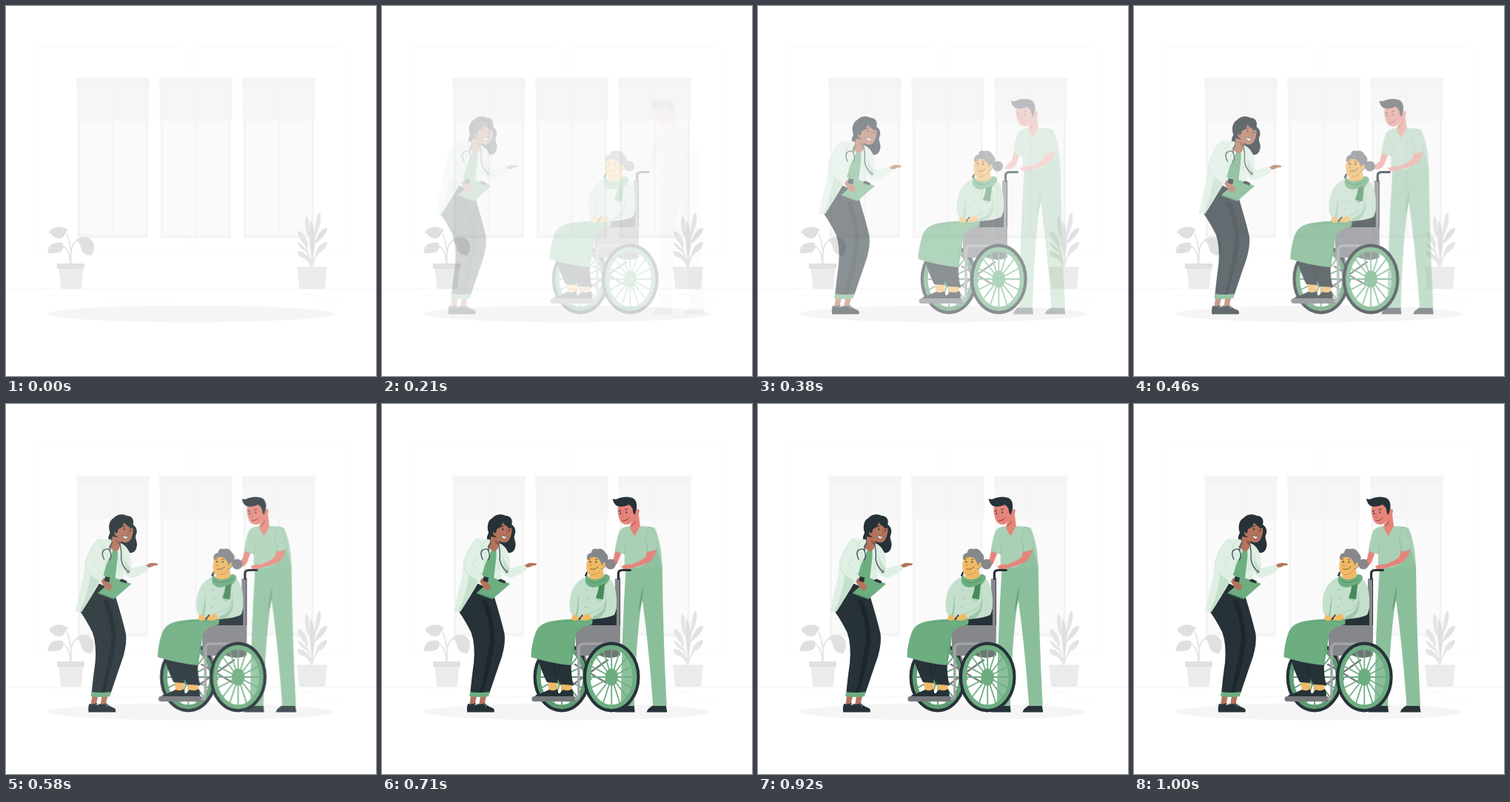
Recreate the animation shown at these times as an HTML page. Size 500x500 px, loop 1040 ms.

```html
<!DOCTYPE html>
<html lang="en">
<head>
<meta charset="utf-8">
<title>Clinic visit</title>
<style>
html, body { margin: 0; width: 100%; height: 100%; overflow: hidden; background: #fff; }
svg { display: block; width: 100vw; height: 100vh; }
.line { fill: none; stroke-linecap: round; stroke-linejoin: round; }
.navy { fill: #263238; }
.green { fill: #6dae81; }
.coat { fill: #dfefe4; }
.fold { fill: #c5dfcd; }
.brown { fill: #b4735b; }
.pink { fill: #e5857a; }
.tan { fill: #efb967; }
.grey { fill: #85878b; }
</style>
</head>
<body>
<svg viewBox="0 0 500 500">
  <defs>
    <g id="window">
      <path fill="#f4f4f4" d="M97 106H192V313.500H97Z"/>
      <path fill="#fafafa" d="M100 108H143V309.500H100ZM145.500 108H188.500V309.500H145.500Z"/>
      <path fill="#f7f7f7" fill-opacity=".7" d="M95.500 107H193.500V155.500H95.500Z"/>
      <path stroke="#f4f4f4" stroke-width="98" stroke-dasharray="1 2" d="M144.500 109V156"/>
      <path fill="#f4f4f4" d="M95 97H194V107.500H95Z"/>
    </g>
  </defs>

  <g id="room">
    <g fill="none" stroke="#fafafa">
      <rect x="39" y="55.500" width="203.500" height="282" rx="5"/>
      <rect x="255" y="55.500" width="203.500" height="282" rx="5"/>
      <path stroke="#f5f5f5" d="M0 382.500H500"/>
      <path stroke="#f8f8f8" d="M56 391H96M135 395.500H224M400 389.500H416M417 398.500H449"/>
    </g>
    <use href="#window"/><use href="#window" x="112"/><use href="#window" x="224"/>
    <ellipse cx="250" cy="416" rx="194" ry="11.300" fill="#f5f5f5"/>
    <g fill="#e0e0e0">
      <path class="line" stroke="#e5e5e5" stroke-width="1.800" d="M87 348C89 330 86 312 79 304M87 348Q86 328 76 324M88 348Q86 318 98 317"/>
      <path d="M58 305C64 297 76 296 84 303C78 307 80 313 73 314C65 314 61 309 58 305Z"/>
      <path d="M57 334C56 323 64 318 76 320C79 325 77 332 71 333Q64 335 57 334Z"/>
      <path d="M95 316C106 307 119 315 119 325Q119 332 115 337C107 337 102 333 101 326Q99 318 95 316Z"/>
      <path fill="#ebebeb" d="M71 354H104.500L101.500 382H74.500Z"/>
      <rect x="69" y="348" width="37" height="7" rx="1"/>
    </g>
    <g fill="#e5e5e5">
      <path class="line" stroke="#e5e5e5" stroke-width="2" d="M413 353Q410 342 400 338M413 353Q416 340 428 324M413 353Q408 330 400 310M413 353L414 320M414 345Q416 312 422 285M414 345L408 290"/>
      <path d="M408 312C403 301 403 288 406 283C411 289 410 302 410 312ZM418 310C417 294 420 281 424 279C427 284 425 297 419 310Z"/>
      <path fill="#e0e0e0" d="M414 334C409 317 410 300 412 290C418 299 419 320 415 334ZM417 322C420 308 428 299 434 300C435 306 425 316 417 322Z"/>
      <path d="M408 326C399 320 393 309 394 304C402 304 407 315 409 326ZM418 336C420 325 428 318 434 319C435 327 426 333 418 336ZM408 342C398 341 393 336 394 331C402 331 407 336 409 342ZM405 332Q395 327 394 319Q403 323 408 334ZM412 352C409 344 407 338 401 337Q411 336 415 350Z"/>
      <path fill="#ebebeb" d="M393 352.500H434L431 382H396.500Z"/>
    </g>
  </g>

  <g id="doctor">
    <!-- hair behind the head -->
    <path class="navy" d="M143 187C139 183 141 178 143 174C140 166 142 157 148 154C152 149 160 148 166 151C173 151 176 157 174 163C180 167 180 173 178 177C176 182 181 187 179 193C178 200 172 203 167 200C161 199 162 193 159 189L153 187C150 185 147 188 143 187Z"/>
    <!-- pointing hand -->
    <path class="brown" d="M191 218L197 215Q202 214 208 216L207 218L202 218.500Q199 221 193 221Z"/>
    <!-- shoes, ankles, trousers -->
    <path class="brown" d="M119 394H127L124 407H117ZM132 394H140L137 407H130Z"/>
    <path class="navy" d="M115 405Q120 407 125 404L130 412V416.500H114Q113 410 115 405ZM128 405Q133 407 138 404Q142 409 149 411Q152 414 150 416.500H127Q126 410 128 405Z"/>
    <path class="line" stroke="#dfefe4" d="M124 407L127 404M137 406L141 403M139 408L143 405"/>
    <path class="navy" d="M123 240L148 252Q160 291 164.500 311Q166 323 161 341Q152 367 144 391H118Q120 370 123 349Q125 325 119.500 309Q111 292 103 281Z"/>
    <path fill="#1c262b" d="M133 264L141 266Q151 297 151 320Q147 354 135 391H131Q141 347 145 319Q146 297 133 264Z"/>
    <path class="green" d="M118 389Q131 391 144 389L143 395Q130 397 117 395Z"/>
    <!-- shirt and coat -->
    <path class="green" d="M138 194L157 192L158 210L151 244L131 238Z"/>
    <path class="coat" d="M155 187Q167 191 171 205L172 222L191 217Q194 219 195 223Q184 232 173 235Q166 235 162 227L152 262L146 258L150 235Q153 213 155 187Z"/>
    <path class="fold" d="M162 205Q165 216 170 221L172 222Q168 225 163 226Z"/>
    <path class="coat" d="M144 183L127 182Q120 187 115 202Q108 216 107 233Q101 256 96 281H104.500Q117 262 131 238Q141 215 141 194Z"/>
    <path class="fold" d="M117 226L128 240Q117 262 104.500 281H102Q114 256 117 226Z"/>
    <path class="coat" stroke="#c5dfcd" stroke-width=".7" d="M128 183Q136 188 132 202L121 217L136 233L132 241Q120 236 111 224Q107 217 112 207Q119 187 128 183Z"/>
    <path class="coat" stroke="#c5dfcd" stroke-width=".7" d="M144 183L136 187L133 201L140 202L136 220Q144 206 148 194ZM156 187L162 195L158 201L161 205L156 225Q154 205 153 196Z"/>
    <!-- neck and head -->
    <path class="brown" d="M146 179L158 181L156 194Q153 200 149 199L141 193Q146 188 146 179Z"/>
    <path fill="#97594a" d="M151 183L158 187L157 191Q152 189 151 183Z"/>
    <path class="brown" d="M153 169Q155 159 163 159Q171 159 174 166Q175 176 171 183Q168 188 162 187Q156 186 153 179Q149 178 149 174Q150 170 153 173Z"/>
    <path class="navy" d="M151 175Q145 164 154 157Q165 150 174 162L174 168Q166 166 162 160Q161 167 154 169Q154 174 151 175Z"/>
    <path class="line" stroke="#263238" d="M160 166L163 165M169 167L172 168"/>
    <path class="line" stroke="#97594a" stroke-width=".8" d="M167 170L169 175L166 176"/>
    <ellipse class="navy" cx="162.200" cy="169.300" rx=".9" ry="1.300"/>
    <ellipse class="navy" cx="170.500" cy="171" rx=".8" ry="1.200"/>
    <path fill="#fff" stroke="#263238" stroke-width=".5" d="M160 177Q164 180 168 179Q166 183 163 182Q161 181 160 177Z"/>
    <!-- stethoscope -->
    <path class="line" stroke="#4b565b" stroke-width="1.400" d="M146 187Q142 193 143 199Q146 207 142 211M135 210Q130 199 136 197Q141 194 143 199M156 188Q159 198 158 210Q160 220 166 225"/>
    <circle cx="167.500" cy="226.500" r="2.300" fill="#85878b"/>
    <!-- clipboard -->
    <path class="green" d="M150 235L172 243L149 263L127 255Z"/>
    <path fill="#579a6d" d="M127 255L149 263L148 264L126.500 256Z"/>
    <path class="navy" d="M157 237L160 236.500L166 239.500L165 242.500L156 239.500Z"/>
    <path class="brown" d="M134 235Q141 239 144 244L147 247L144 248.500L145 251Q139 253 136 248L131 240Z"/>
    <path class="navy" d="M137 233L143 234.500L142 241L135 239Z"/>
  </g>

  <g id="patient">
    <g id="nurse">
      <path class="navy" d="M324 407H343L344 416.500H317Q318 411 324 407ZM369 407H386L387.500 416.500H360Q360 412 369 407Z"/>
      <path fill="#8bbf9b" d="M332 219H381Q382 315 387 408H368.500Q363 330 354 264Q346 307 343 408H325Q326 315 332 219Z"/>
      <path fill="#6da57f" d="M355 247Q356 265 349 281Q350 262 355 247Z"/>
      <path class="pink" d="M318 196L326 200L322 211Q320 219 311 221L304 219L315 209Z"/>
      <path fill="#a9d0b5" d="M338 165Q326 166 323 172Q319 183 317 198Q323 202 330 203V221H381Q380 187 371 168Q369 165 350 165Z"/>
      <path fill="#8fc19f" d="M374 194L381 221H350Q367 213 368 201Z"/>
      <path class="line" stroke="#8fc19f" stroke-width=".8" d="M330 203L332 187M361 199Q362 190 358 182"/>
      <path class="pink" d="M361 196L373 197Q371 207 364 213Q355 218 341 221Q336 224 328 223L326 219Q332 216 339 217Q353 212 359 206Z"/>
      <path fill="#a9d0b5" stroke="#8fc19f" stroke-width=".6" d="M363 166Q370 168 375 194Q369 200 361 199Q362 188 358 181Z"/>
      <path class="pink" d="M339 152L349 148L351 165L344 178Q339 173 337 165L341 162Z"/>
      <path fill="#cc6a62" d="M338 162Q344 160 346 155Q345 163 340 166Z"/>
      <path class="pink" d="M321 139Q329 134 343 137L345 143Q349 140 350 144Q350 150 345 150Q343 159 337 162Q329 165 324 158Q320 149 321 139Z"/>
      <path class="navy" d="M314 128Q319 130 323 127Q333 124 341 127Q347 130 346.500 140L344 150Q341 147 341 142Q339 138 336 136Q328 140 320 138Q315 135 314 128Z"/>
      <path class="line" stroke="#263238" d="M322 145L325 144M331 143L334 142"/>
      <path class="line" stroke="#cc6a62" stroke-width=".9" d="M328 148.500L326 153L329 154"/>
      <ellipse class="navy" cx="324.500" cy="148" rx=".8" ry="1.300"/>
      <ellipse class="navy" cx="332.500" cy="146.500" rx=".8" ry="1.300"/>
      <path class="line" stroke="#7d2d2d" stroke-width=".9" d="M328 157.500Q333 158 336 154"/>
    </g>

    <!-- far wheel, chair frame -->
    <g class="wheel" data-x="244" data-tint="#5d9d71"></g>
    <path class="line" stroke="#75787c" stroke-width="2.500" d="M262 352L303 376M258 380L306 346M275 340L283 372"/>
    <path class="grey" d="M316 236H322V304H316Z"/>
    <path class="line" stroke="#263238" stroke-width="3.200" d="M320.500 236V230Q320 224.500 326 224.500H336.500"/>
    <path class="line" stroke="#263238" d="M322.500 236V300"/>
    <path class="navy" d="M280 291L318 277V301H280Z"/>
    <path class="grey" d="M271 299H323V340H263V306Q264 300 271 299Z"/>
    <ellipse cx="309" cy="338" rx="14" ry="5" fill="#707377"/>
    <!-- legs and feet -->
    <path class="tan" d="M225 374L238 376L239 389H227ZM243 376L257 378L258 389H244Z"/>
    <path class="navy" d="M211 342L242 346L238 377L224 376Q216 360 211 342ZM232 345L257 350Q256 365 260 380L243 379Q234 361 232 345Z"/>
    <path class="line" stroke="#1c262b" d="M232 346Q234 361 242 378"/>
    <path class="navy" d="M227 386Q233 389 238 385L241 396H207Q209 392 216 391ZM246 386Q252 389 258 385Q260 388 260 397H233Q234 392 241 391Z"/>
    <rect x="203.500" y="395" width="60" height="7" rx="3.500" fill="#75787c"/>
    <!-- blanket -->
    <path class="green" d="M286 290Q248 290 230 293.500Q212 297 208 311Q203 325 202.500 342Q231 351 257 353Q261 333 263 315Q264 302 285 298Z"/>
    <path class="line" stroke="#579a6d" stroke-width=".7" d="M230 297Q258 290 280 295M257 352Q256 338 261 322"/>
    <!-- blouse and hands -->
    <path class="fold" d="M279 233Q267 236 260 248Q253 262 255 279L259 288L266 290H285Q302 291 315 285Q319 279 318 262Q317 243 308 235Z"/>
    <path fill="#9cc8a9" d="M264 279Q266 267 267 257Q268 273 265 288L262 288ZM286 287Q303 282 304 262Q307 282 293 290L286 291Z"/>
    <path class="line" stroke="#9cc8a9" stroke-width=".8" d="M303 255Q306 270 296 277Q288 280 282 283"/>
    <g class="green"><circle cx="277" cy="251" r=".8"/><circle cx="279" cy="263" r=".8"/><circle cx="276" cy="275" r=".8"/></g>
    <path class="navy" d="M266 291L272 284L274 292Z"/>
    <path class="tan" d="M259 285L266 286L267 291Q262 295 257 291ZM270 288L279 283Q284 286 284 290Q277 294 269 292Z"/>
    <!-- head and scarf -->
    <path class="tan" d="M283 224L299 220L302 236Q292 243 281 235Z"/>
    <path class="navy" d="M277 227L279 226L278 234L275 232Z"/>
    <circle class="grey" cx="310" cy="216.500" r="7"/>
    <path class="grey" d="M278 210Q277 202 284 201Q285 194 292 196Q299 194 303 201Q309 206 305 214Q304 223 296 224L284 213Z"/>
    <path class="tan" d="M280 208Q287 202 295 208L298 215Q302 212 303 216Q303 222 298 222Q294 231 286 232Q278 231 278 225Q276 216 280 208Z"/>
    <path class="grey" d="M278 210Q280 201 288 201Q297 203 301 214L298 218Q297 210 290 207Q283 206 278 210Z"/>
    <path class="line" stroke="#6e5333" stroke-width=".9" d="M280 210L283 209M289 210L292 210M283 223Q288 225 293 220"/>
    <path class="line" stroke="#cf9345" stroke-width=".9" d="M285 213L282 218L285 219M284 231Q292 231 296 226"/>
    <ellipse class="navy" cx="282.500" cy="213" rx=".8" ry="1.300"/>
    <ellipse class="navy" cx="290.500" cy="213.500" rx=".8" ry="1.300"/>
    <path class="green" d="M278 231Q282 238 290 237Q300 236 302 230Q309 230 309 235Q307 241 302 245L300 264L290 262Q294 252 294 246Q284 251 277 243Q274 237 278 231Z"/>
    <path class="line" stroke="#478a5d" stroke-width=".8" d="M279 238Q290 246 304 236M293 262V265M296 263V266"/>
    <path fill="#478a5d" d="M294 246L302 243L300 264L290 262Q294 252 294 246Z"/>
    <!-- side frame and near wheel -->
    <path class="line" stroke="#a2a4a7" stroke-width="3.500" d="M263 399Q267 398 267 391V331Q267 324 274 324H321"/>
    <g class="wheel" data-x="311.300" data-tint="#6dae81"></g>
  </g>
</svg>
<script>
const LOOP = 1040, FPS = 24, SLIDE = 30, START = 3, SPOKES = 16;
const byId = id => document.getElementById(id);

function drawWheel(g) {
  const { x, tint } = g.dataset;
  let spokes = '';
  for (let i = 0; i < SPOKES; i++) {
    const a = i * 2 * Math.PI / SPOKES;
    spokes += `M0 0L${31 * Math.cos(a)} ${40 * Math.sin(a)}`;
  }
  g.setAttribute('transform', `translate(${x} 369)`);
  g.innerHTML = `<g fill="none" stroke="${tint}">
    <path stroke-width="1.800" d="${spokes}"/>
    <ellipse rx="31.500" ry="40.500" stroke-width="6"/>
    <ellipse rx="36.300" ry="45.300" stroke="#263238" stroke-width="4.200"/>
    <ellipse rx="9" ry="11.500" fill="${tint}" stroke="none"/></g>`;
}
document.querySelectorAll('.wheel').forEach(drawWheel);

const curve = (s, a, b) => 3 * (1 - s) * (1 - s) * s * a + 3 * (1 - s) * s * s * b + s ** 3;

// cubic-bezier(.36, -.01, .5, 1.38): overshoots, then settles
function ease(x) {
  let lo = 0, hi = 1;
  for (let i = 0; i < 24; i++) {
    const mid = (lo + hi) / 2;
    if (curve(mid, .36, .5) < x) lo = mid; else hi = mid;
  }
  return curve(hi, -.01, 1.38);
}

function slide(id, from, p, shown) {
  const g = byId(id);
  g.setAttribute('transform', `translate(${from * (1 - p)} 0)`);
  g.setAttribute('opacity', shown ? Math.max(0, Math.min(1, p)) : 0);
}

function draw(now) {
  const step = Math.floor((now % LOOP + 5) * FPS / 1000);
  const p = ease(Math.min(1, step / FPS + .024));
  const shown = step >= START;
  slide('doctor', -SLIDE, p, shown);
  slide('patient', SLIDE, p, shown);
  // nested in the patient group, so shift and fade compound
  slide('nurse', SLIDE, p, shown);
}

const begin = performance.now();
function tick() {
  draw(performance.now() - begin);
  requestAnimationFrame(tick);
}
tick();
</script>
</body>
</html>
```
